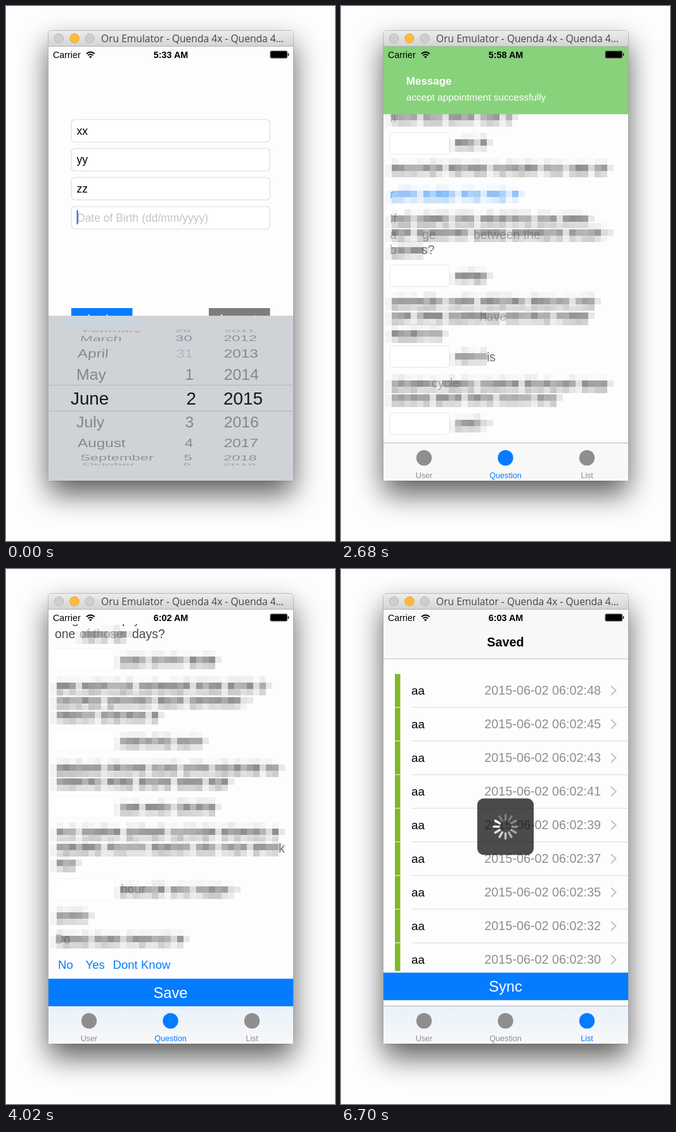
An HTML page for the animation above (8000 ms loop, 519 by 843 pixels).

```html
<!DOCTYPE html>
<html lang="en">
<head>
<meta charset="utf-8">
<title>App walkthrough</title>
<style>
html, body { margin: 0; width: 100%; height: 100%; overflow: hidden; background: #fdfdfd; }
svg { display: block; width: 100vw; height: 100vh; }
text { font-family: "Liberation Sans", Arial, sans-serif; white-space: pre; }
.title { font-family: "Open Sans", "Noto Sans", sans-serif; }
.shadow { filter: blur(22.5px); }
.mosaic rect { shape-rendering: crispEdges; }
.scene { visibility: hidden; animation: 8s step-end infinite; }
</style>
</head>
<body>
<svg id="stage" viewBox="0 0 519 843" preserveAspectRatio="none">
  <defs>
    <linearGradient id="bar" x2="0" y2="1"><stop stop-color="#ececec"/><stop offset="1" stop-color="#d3d3d3"/></linearGradient>
    <linearGradient id="panel" x2="0" y2="1"><stop stop-color="#e6e6e6"/><stop offset=".3" stop-color="#f1f1f1"/><stop offset=".7" stop-color="#f3f3f3"/><stop offset="1" stop-color="#e6e7e8"/></linearGradient>
    <linearGradient id="tabTint" x2="0" y2="1"><stop stop-color="#e9f1fa"/><stop offset="1" stop-color="#f8f8f8"/></linearGradient>
    <radialGradient id="glow"><stop stop-color="#c6e5fd"/><stop offset=".5" stop-color="#d2e9fa" stop-opacity=".8"/><stop offset="1" stop-color="#e8f0f6" stop-opacity="0"/></radialGradient>
    <clipPath id="panelClip"><rect x="97" y="276" width="325.500" height="260" rx="8"/></clipPath>
  </defs>
</svg>
<script>
const BLUE = '#047cff', GREY = '#8e8e8e', INK = '#4a4a4a', PAPER = '#fdfdfd';
const LOOP = 8000, STEP = 1340;

const rect = (x, y, w, h, fill, more = '') =>
  `<rect x="${x}" y="${y}" width="${w}" height="${h}" fill="${fill}" ${more}/>`;
const line = (x1, x2, y, color) =>
  `<path d="M${x1} ${y}H${x2}" stroke="${color}" stroke-width="1.200"/>`;
const dot = (x, y, r, fill, more = '') =>
  `<circle cx="${x}" cy="${y}" r="${r}" fill="${fill}" ${more}/>`;
const text = (s, x, y, size, fill = '#000', more = '') =>
  `<text x="${x}" y="${y}" font-size="${size}" fill="${fill}" ${more}>${s}</text>`;
const mid = 'text-anchor="middle"', end = 'text-anchor="end"', bold = 'font-weight="bold"';

// Small seeded generator, so the mosaic never changes between loops
function seeded(seed) {
  return () => {
    seed = (seed * 1664525 + 1013904223) % 4294967296;
    return seed / 4294967296;
  };
}

function frame() {
  const button = (x, fill, edge) => dot(x, 51, 7.2, fill, `stroke="${edge}"`);
  return rect(67, 60, 386, 709, '#000', 'class="shadow" opacity=".64"') +
    rect(66.5, 38.5, 387, 709.5, PAPER, 'rx="5" stroke="#000" stroke-opacity=".22"') +
    '<path d="M67 64V44a5 5 0 0 1 5-5H448a5 5 0 0 1 5 5V64Z" fill="url(#bar)"/>' +
    line(67, 453, 63.5, '#b3b3b3') +
    button(83.5, '#cecece', '#b7b7b7') + button(108, '#fdbd38', '#e0a033') + button(132, '#cecece', '#b7b7b7') +
    text('Oru Emulator - Quenda 4x - Quenda 4…', 150, 57, 15.6, '#454545', 'class="title"');
}

const screen = fill => rect(67, 64, 386, 684, fill);

function status(time) {
  return text('Carrier', 74, 82, 14.3) + text(time, 260, 82, 14.4, '#000', `${mid} ${bold}`) +
    '<path d="M126.800 75.300q6.500-5.600 13 0M129.300 77.900q4-3.400 8 0" fill="none" stroke="#000" stroke-width="1.900"/>' +
    '<path d="M131 79.900q2.300-1.800 4.600 0L133.300 82.200Z"/>' +
    rect(416.8, 70.8, 27, 11.4, '#000', 'rx="2" stroke="#8a8a8a"') +
    rect(444.5, 74.3, 1.8, 4.4, '#222', 'rx=".8"');
}

function tabs(active, { fill = '#f8f8f8', edge = '#b4b4b4', on = BLUE, off = GREY } = {}) {
  return rect(67, 688, 386, 60, fill) + line(67, 453, 688.5, edge) +
    ['User', 'Question', 'List'].map((name, i) => {
      const x = [131, 259.5, 388][i], color = i === active ? on : off;
      return dot(x, 712, 12.2, color) + text(name, x, 744, 12.6, color, mid);
    }).join('');
}

const field = (y, fill, edge) =>
  rect(103, y, 313.5, 35.5, fill, `rx="6" stroke="${edge}" stroke-width="1.200"`);

const wideButton = (label, y) =>
  rect(67, y, 386, 43.4, BLUE) + text(label, 259.5, y + 30, 23.6, '#fff', mid);

// Picker rows are drawn flatter towards the rim of the drum
function drum() {
  const months = ['February', 'March', 'April', 'May', 'June', 'July', 'August', 'September', 'October'];
  const days = [29, 30, 31, 1, 2, 3, 4, 5, 6];
  const centers = [512.5, 524, 547.5, 580.5, 618.3, 656, 688.2, 711.5, 722];
  const squash = [.2, .5, .78, .95, 1, .95, .78, .5, .2];
  const inset = [19, 15, 11, 9, 0, 9, 11, 15, 19];
  return months.map((month, i) => {
    const far = Math.abs(i - 4), size = [27.8, 24.8, 24.3, 23.7, 23.2][far];
    const color = ['#15171a', '#84878c', '#85888d', '#8f9298', '#a0a4aa'][far];
    const cell = (s, x, skew, more, fill = color) =>
      text(s, 0, size * .36, size, fill,
        `${more} transform="translate(${x} ${centers[i]}) skewX(${skew}) scale(1 ${squash[i]})"`);
    return cell(month, 102 + inset[i], Math.min(0, i - 3) * 4, '') +
      cell(days[i], 300 - inset[i] * .42, 0, end, i === 2 ? '#b3b7bd' : color) +
      cell(2011 + i, 374 - inset[i] * .3, Math.min(0, 5 - i) * 4, mid);
  }).join('');
}

function birthScene() {
  return screen(PAPER) + status('5:33 AM') +
    [179, 224.5, 270, 316].map(y => field(y, '#fff', '#dcdcdc')).join('') +
    ['xx', 'yy', 'zz'].map((s, i) => text(s, 111.5, 202.5 + i * 45.6, 17.5)).join('') +
    text('Date of Birth (dd/mm/yyyy)', 112, 339.5, 17.5, '#c5c5ca') +
    rect(111.5, 322, 2.2, 22, '#4267e0') +
    rect(103, 476, 96.5, 35, BLUE) + rect(320, 476, 96.5, 35, '#7d7d7d') +
    text('login', 151, 501.5, 21.5, '#fff', mid) + text('logout', 367, 501.5, 21.5, '#fff', mid) +
    rect(67, 488, 386, 260, '#cfd3d8') +
    '<ellipse cx="151" cy="497" rx="62" ry="9" fill="#bfd6ea" opacity=".35"/>' +
    line(67, 453, 597.5, '#b1b5ba') + line(67, 453, 638.5, '#b1b5ba') + drum();
}

function alertScene() {
  const option = (s, y, color, more = '', size = 21.2) => text(s, 259.5, y, size, color, `${mid} ${more}`);
  return screen('#999') + status('5:37 AM') +
    [179, 224.5, 270].map(y => field(y, '#666', '#838383')).join('') +
    text('aa', 111.5, 202.5, 17) + text('bb', 111.5, 248, 17) +
    text('Not Patient?', 259.5, 668, 18.7, '#424242', mid) +
    tabs(0, { fill: '#949494', edge: '#6c6c6c', on: '#464646', off: '#616161' }) +
    '<g clip-path="url(#panelClip)">' + rect(97, 276, 325.5, 260, 'url(#panel)') +
    '<ellipse cx="151" cy="495" rx="72" ry="42" fill="url(#glow)"/></g>' +
    [377.5, 430.5, 483.5].map(y => line(97, 422.5, y, '#bdbfc2')).join('') +
    option('Appointment', 320, '#000', bold, 20) + option('2015-06-01 09:00:00', 348.5, '#000', '', 16.5) +
    option('Accept', 412, BLUE) + option('Decline', 464.5, '#fb3b32', '', 20.8) +
    option('Postpone', 517.5, BLUE, bold, 20);
}

// Blurred-out words: each line is [top of its dark row, left, right]
function mosaic(lines, seed, color = '#505050') {
  const rnd = seeded(seed);
  let out = '';
  for (const [y, left, right] of lines) {
    let run = 3 + Math.floor(rnd() * 6);
    for (let x = left; x < right; x += 10) {
      const ink = run-- > 0 ? 1 : .35;
      if (ink < 1) run = 3 + Math.floor(rnd() * 6);
      const cell = (dy, a) => out += rect(x, y + dy, 10, 10, color, `opacity="${(a * ink).toFixed(2)}"`);
      cell(-10, rnd() * .1);
      cell(0, .4 + rnd() * .24);
      cell(10, .12 + rnd() * .18);
    }
    out += rect(left - 10, y, 10, 20, color, 'opacity=".06"') + rect(right, y, 10, 10, color, 'opacity=".12"');
  }
  return `<g class="mosaic">${out}</g>`;
}

const remnants = list => list.map(([s, x, y, color = '#b4b4b4']) => text(s, x, y, 19.4, color)).join('');
const answers = (tops, edge) =>
  tops.map(y => rect(77, y, 94.5, 34, '#fff', `rx="6" stroke="${edge}"`)).join('');

function messageScene() {
  return screen(PAPER) +
    answers([199.5, 408, 535.5, 641.5], '#e7e7e7') +
    remnants([['fi', 77, 183], ['If', 77, 342], ['a', 77, 367], ['ge', 128, 367], ['between the', 209, 367],
      ['b', 77, 391], ['s?', 127, 391, '#777'], ['have', 219, 496], ['is', 230, 560, '#777'], ['cycle', 143, 601]]) +
    mosaic([[170, 80, 270], [210, 180, 230], [250, 80, 420], [330, 80, 390], [352, 80, 420], [380, 80, 130],
      [420, 180, 230], [460, 80, 400], [483, 80, 390], [511, 80, 160], [547, 180, 230],
      [590, 80, 420], [612, 80, 340], [652, 180, 230]], 17) +
    text('r', 77, 303, 18.6, '#6fb0f8') + mosaic([[291, 80, 280]], 8, '#3f97f5') +
    rect(67, 64, 386, 106.5, '#88d27c') + status('5:58 AM') +
    text('Message', 103, 123.5, 16.9, '#fff', bold) +
    text('accept appointment successfully', 103, 149, 15.3, '#fff') + tabs(1);
}

function surveyScene() {
  return screen(PAPER) +
    answers([125, 254, 358, 488], '#f4f4f4') +
    remnants([['g', 104, 86, INK], ['p', 183, 86, INK], ['y', 202, 86, INK], ['one', 77, 109, INK],
      ['of those', 116, 109], ['days?', 199, 109, INK], ['k', 430, 447, '#777'], ['hour', 181, 511], ['Do', 77, 590]]) +
    mosaic([[98, 120, 190], [138, 180, 330], [179, 80, 410], [202, 80, 380], [225, 80, 240], [266, 180, 310],
      [308, 80, 430], [330, 80, 350], [370, 180, 330], [409, 80, 430], [433, 80, 430], [458, 80, 110],
      [500, 180, 360], [541, 80, 130], [578, 80, 280]], 43) +
    rect(67, 64, 386, 23, PAPER) + status('6:02 AM') +
    text('No', 82, 630, 18.6, BLUE) + text('Yes', 125.5, 630, 18.6, BLUE) +
    text('Dont Know', 168.5, 630, 18.6, BLUE) +
    tabs(1, { fill: 'url(#tabTint)' }) + wideButton('Save', 645.6);
}

function listScene(time, hour, seconds, colors) {
  let rows = '';
  for (let i = 0; i < 9; i++) {
    const y = 165 + i * 53, used = i < seconds.length;
    if (used) {
      rows += rect(85, y + .5, 8.5, i < 8 ? 52 : 44, colors[i % colors.length]) +
        text('aa', 111, y + 33, 18.9) +
        text(`2015-06-02 ${hour}:${seconds[i]}`, 410, y + 33, 19.8, GREY, end) +
        `<path d="M426 ${y + 19.2}l7.500 7.300-7.500 7.300" fill="none" stroke="#c4c4c8" stroke-width="2.200"/>`;
    }
    if (i < 8) rows += line(used ? 111 : 85, 453, y + 53, '#dadadc');
  }
  return screen(PAPER) + rect(67, 64, 386, 77, '#f8f8f8') + line(67, 453, 141.5, '#c4c4c4') +
    status(time) + text('Saved', 259.5, 122, 19.8, '#000', `${mid} ${bold}`) +
    rows + wideButton('Sync', 636) + tabs(2, { fill: 'url(#tabTint)' });
}

function spinner() {
  let spokes = '';
  for (let i = 0; i < 12; i++) {
    const lag = (10 - i + 12) % 12;
    spokes += `<path d="M0-10.500V-18.700" transform="rotate(${i * 30})" opacity="${Math.max(.27, 1 - lag * .085).toFixed(2)}"/>`;
  }
  return rect(215, 361.5, 89, 89, '#000', 'rx="10" opacity=".7"') +
    `<g transform="translate(259.500 406)" stroke="#fff" stroke-width="3.600" stroke-linecap="round">${spokes}</g>`;
}

const GREEN = '#7fb927';
const scenes = [
  birthScene(), alertScene(), messageScene(), surveyScene(),
  listScene('5:39 AM', '05:38', ['23', '03'], ['#ff1d17', GREEN]),
  listScene('6:03 AM', '06:02', [48, 45, 43, 41, 39, 37, 35, 32, 30], [GREEN]) + spinner()
];

const pct = ms => Math.min(100, ms / LOOP * 100) + '%';
const css = scenes.map((_, i) =>
  `@keyframes show${i}{0%{visibility:hidden}${pct(i * STEP)}{visibility:visible}${pct((i + 1) * STEP)}{visibility:hidden}}`);
document.head.insertAdjacentHTML('beforeend', `<style>${css.join('')}</style>`);
document.getElementById('stage').insertAdjacentHTML('beforeend', frame() +
  scenes.map((s, i) => `<g class="scene" style="animation-name:show${i}">${s}</g>`).join(''));
</script>
</body>
</html>
```
